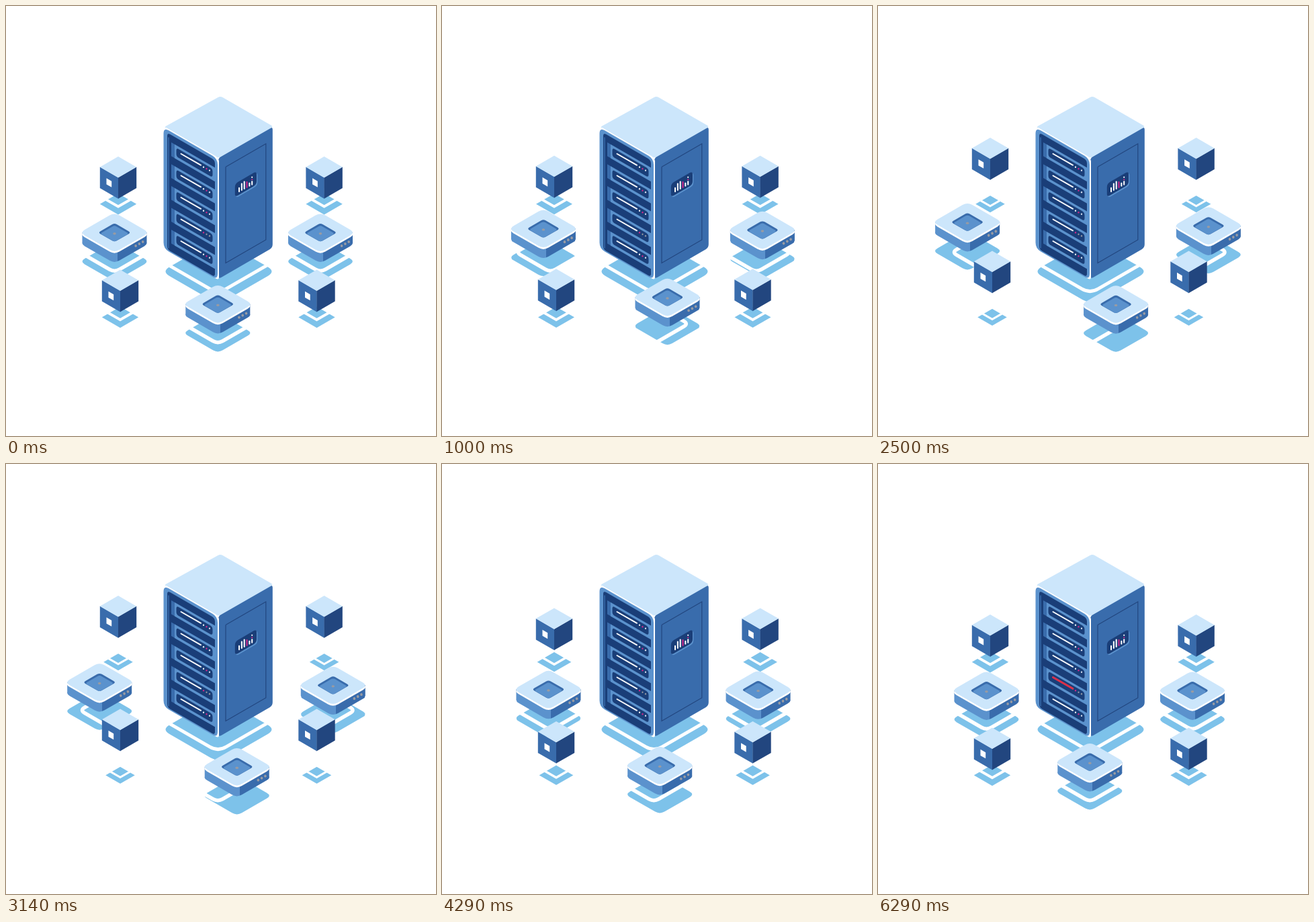
Write an HTML page with a canvas that moves like this. It is 640 px wide and 640 px high and loops after 7210 ms.

```html
<!DOCTYPE html>
<html lang="en">
<head>
<meta charset="utf-8">
<title>Server network</title>
<style>
html, body { margin: 0; width: 100%; height: 100%; overflow: hidden; background: #fff; }
canvas { display: block; }
</style>
</head>
<body>
<canvas id="stage" width="640" height="640"></canvas>
<script>
const c = document.getElementById('stage').getContext('2d');
const LOOP = 7210, MOVE = 4800, ISO = 1 / Math.sqrt(3);
const PALE = '#cce6fb', SKY = '#7dc2ea', LIGHT = '#5b92cd', MID = '#396cac',
      DEEP = '#22467f', NAVY = '#1a3e78', PINK = '#d6278c', RED = '#dc2f48', GREY = '#989ba3';

// Closed path; every corner is rounded off from distance r on both edges
function trace(p, r) {
  const n = p.length / 2, at = i => [p[2 * (i % n)], p[2 * (i % n) + 1]];
  const toward = ([x, y], [u, v]) => {
    const k = r / Math.hypot(u - x, v - y);
    return [x + (u - x) * k, y + (v - y) * k];
  };
  c.beginPath();
  for (let i = 0; i < n; i++) {
    const corner = at(i);
    c.lineTo(...toward(corner, at(i + n - 1)));
    c.quadraticCurveTo(...corner, ...toward(corner, at(i + 1)));
  }
  c.closePath();
}
function poly(color, p, r = 0) {
  trace(p, r);
  c.fillStyle = color;
  c.fill();
}
function outline(color, width, p, r = 0) {
  trace(p, r);
  c.strokeStyle = color;
  c.lineWidth = width;
  c.stroke();
}

// Isometric square of half width w, and its rounded version with the same extent
const rhombus = (x, y, w) => [x, y - w * ISO, x + w, y, x, y + w * ISO, x - w, y];
const slab = (x, y, w) => [rhombus(x, y, w / .93), w * .174];

// Parallelogram with vertical sides and a slanted top
const wall = (x1, x2, y, h, slope = ISO) =>
  [x1, y, x2, y + (x2 - x1) * slope, x2, y + (x2 - x1) * slope + h, x1, y + h];

function line(color, width, p, cap = 'round') {
  c.beginPath();
  for (let i = 0; i < p.length; i += 2) c.lineTo(p[i], p[i + 1]);
  c.strokeStyle = color;
  c.lineWidth = width;
  c.lineCap = cap;
  c.stroke();
}
function dot(color, x, y, rx, ry = rx) {
  c.beginPath();
  c.ellipse(x, y, rx, ry, 0, 0, 7);
  c.fillStyle = color;
  c.fill();
}

function ease(t, from, to) {
  const p = Math.min(1, Math.max(0, (t - from) / (to - from)));
  return (1 - Math.cos(Math.PI * p)) / 2;
}

// Four straight legs of equal duration around a diamond
const CORNERS = [[0, 0], [24.2, -12.3], [40.4, -.8], [21, 11.8], [0, 0]];
function orbit(t) {
  const leg = 4 * Math.min(t / MOVE, .9999), i = Math.floor(leg);
  return CORNERS[i].map((v, k) => v + (CORNERS[i + 1][k] - v) * (leg - i));
}

function cube(x, y, lift) {
  const s = 1 - lift / 140, sy = y + 70.7;
  poly(SKY, rhombus(x, sy, 27.2 * s));
  line('#fff', 3.8 * s, [x - 27 * s, sy - 11.7 * s, x, sy + 3.8 * s, x + 27 * s, sy - 11.7 * s], 'butt');
  y -= lift;
  poly(MID, wall(x - 27.2, x + .3, y + 15.6, 31.4));
  poly(DEEP, wall(x, x + 27.2, y + 31.3, 31.4, -ISO));
  poly(PALE, rhombus(x, y + 15.7, 27.2));
  poly('#fff', wall(x - 17.5, x - 9.8, y + 32.3, 9.1));
}

// The white ring stays at rest while shadow and box slide by dx, dy
function drive(x0, y0, dx, dy) {
  const x = x0 + dx, y = y0 + dy;
  poly(SKY, ...slab(x, y + 43, 48));
  outline('#fff', 5.5, ...slab(x0, y0 + 29.3, 48));
  const side = c.createLinearGradient(x + 4, 0, x + 4.01, 0);
  side.addColorStop(0, LIGHT);
  side.addColorStop(1, MID);
  poly(side, ...slab(x, y + 16, 48));
  poly(side, wall(x - 48, x + 48, y, 16, 0));
  poly('#fff', ...slab(x, y + 2.6, 48.3));
  poly(PALE, ...slab(x, y, 48));
  poly(MID, ...slab(x, y, 22.7));
  poly(LIGHT, ...slab(x, y + 1.5, 19.8));
  dot(GREY, x, y + 1.5, 2.3, 1.7);
  for (let i = 0; i < 3; i++) dot(GREY, x + 31.6 + i * 5.3, y + 19.8 - i * 3, 1.8, 2.1);
}

function bay(i, fill) {
  const y = i * 32.5;
  poly(MID, wall(246, 311, y + 203, 20.5));
  poly(LIGHT, wall(251, 311, y + 206, 20.5));
  poly(NAVY, wall(253.5, 307.5, y + 211, 13), 4);
  const bar = (color, width, part) =>
    line(color, width, [260.5, y + 220, 260.5 + 29.5 * part, y + 220 + 16.8 * part]);
  bar('#fff', 2, 1);
  if (fill > 0) bar(RED, 3, fill);
  const lamps = i == 3 ? [PINK, GREY, GREY] : ['#fff', PINK, '#dfe6f2'];
  lamps.forEach((color, k) => dot(color, 294 + k * 4.5, y + 239.7 + k * 2.5, 1.1, 1.3));
}

function display() {
  poly(LIGHT, wall(342, 374.3, 266, 20, -ISO), 5);
  poly(NAVY, wall(340.8, 373, 264.4, 20, -ISO), 5);
  [5.5, 9.5, 10.5, 8, 4, 4.5].forEach((h, i) => {
    const x = 347 + i * 3.84, y = 276.2 - i * 2.1;
    line(i == 3 ? PINK : '#fff', 2, [x, y, x, y - h]);
  });
  dot(PINK, 366.2, 258.3, 1.1);
  dot('#fff', 366.2, 254.8, 1.1);
}

function server(fill) {
  poly(SKY, ...slab(316.5, 395.2, 79));
  outline('#fff', 5, ...slab(315.5, 379, 79));

  poly(MID, wall(316, 396.8, 226, 180.5, -ISO), 5);
  poly('#fff', wall(234.5, 317, 179.5, 181), 5);
  poly(PALE, [319, 134, 398, 179.5, 316, 226.5, 235, 180.5], 4);
  line('#fff', 1.8, [238, 181.8, 312, 224.5, 316, 231, 316, 402]);
  poly(LIGHT, wall(234.5, 315, 180.8, 180.2), 9);
  poly(NAVY, wall(240, 311, 188.5, 173.8), 5);
  line(MID, 1.5, [242, 196, 242, 360]);
  for (let i = 0; i < 5; i++) bay(i, i == 3 ? fill : 0);

  outline(DEEP, 1.2, wall(327, 386.8, 239.5, 143, -ISO));
  display();
}

function draw(t) {
  const sway = ease(t, 0, MOVE / 2) - ease(t, MOVE / 2, MOVE);
  const lift = 28 * (ease(t, 860, 1930) - ease(t, 3400, 4880));
  c.fillStyle = '#fff';
  c.fillRect(0, 0, 640, 640);
  server(ease(t, 5500, 6290));
  cube(167, 224, lift);
  cube(473.6, 224, lift);
  drive(161.5, 337.2, -28.5 * sway, -15.6 * sway);
  drive(468, 337.2, 24 * sway, -10 * sway);
  drive(315.3, 443.7, ...orbit(t));
  cube(170, 392.5, lift);
  cube(462.5, 392.5, lift);
}

const start = performance.now();
function frame() {
  draw((performance.now() - start) % LOOP);
  requestAnimationFrame(frame);
}
frame();
</script>
</body>
</html>
```
